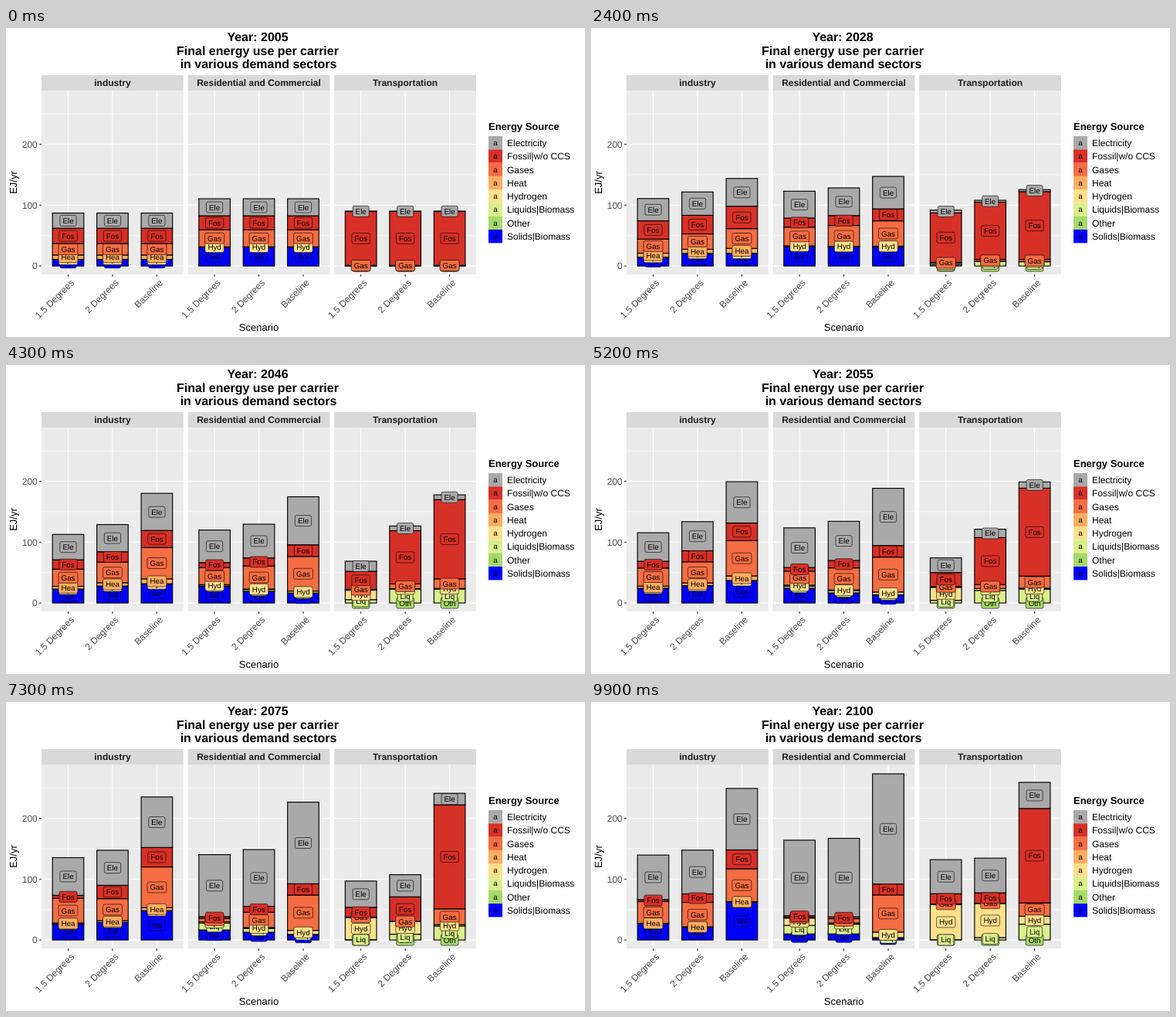
An HTML page that plays this animation: 750x400 px, repeating every 10000 ms.

```html
<!DOCTYPE html>
<html lang="en">
<head>
<meta charset="utf-8">
<title>Final energy use per carrier</title>
<style>
  html, body { margin: 0; width: 100%; height: 100%; overflow: hidden; background: #fff; }
  svg {
    display: block;
    font-family: "Liberation Sans", Arial, sans-serif;
    text-rendering: geometricPrecision;
  }
  .bold { font-weight: bold; }
</style>
</head>
<body>
<svg id="stage" width="750" height="400" viewBox="0 0 750 400"></svg>
<script>
const STEP_MS = 100, STEPS = 100, LAST = STEPS - 1;
const SPLIT = 16;                   // step of 2020, where the scenarios take over
const ZERO = 308.1, UNIT = 0.788;   // y of 0 EJ/yr, pixels per EJ/yr
const BAR_W = 40.6, LABEL_H = 14;

const CARRIERS = {
  Ele: ['Electricity', '#a9a9a9'],
  Fos: ['Fossil|w/o CCS', '#d73027'],
  Gas: ['Gases', '#f46d43'],
  Hea: ['Heat', '#fdae61'],
  Hyd: ['Hydrogen', '#fee08b'],
  Liq: ['Liquids|Biomass', '#d9ef8b'],
  Oth: ['Other', '#a6d96a'],
  Sol: ['Solids|Biomass', '#0000ff']
};
const SCENARIOS = ['1.5 Degrees', '2 Degrees', 'Baseline'];
const NONE = [0, [0, 0], [0, 0], [0, 0]];

// Energy use in EJ/yr, stacked from the top down: the value in 2005, then for
// each scenario a few values evenly spaced from 2020 to 2100.
const SECTORS = [
  { name: 'industry', x: 46, use: {
    Ele: [25, [34, 42, 61, 73], [35, 50, 72], [39, 72, 101]],
    Fos: [25, [33, 15, 5, 3], [34, 17, 22, 14], [39, 28, 32, 31]],
    Gas: [19, [21, 27, 31, 42, 36], [22, 34, 36, 40], [26, 52, 67, 54]],
    Hea: [7, [7, 3, 0.5], [7, 4, 0.7], [8, 8, 5, 1]],
    Hyd: NONE,
    Sol: [11, [12, 23, 26, 27], [17, 28, 29, 21], [17, 40, 62]]
  } },
  { name: 'Residential and Commercial', x: 235.6, use: {
    Ele: [28, [40, 54, 100, 124], [41, 56, 91, 129], [44, 80, 131, 181]],
    Fos: [23, [18, 8, 3, 2.5], [18, 13, 10, 3], [20, 18]],
    Gas: [28, [31, 28, 6, 1.5], [32, 38, 26, 7], [35, 57, 58, 61]],
    Hyd: [0.5, [0.5, 2, 2, 12], [0.5, 2], [0.5, 5, 9]],
    Liq: [0, [0, 1, 11, 14], [0, 3, 6, 16], [0, 1]],
    Sol: [31, [33, 27, 17, 10], [34, 19, 13, 10], [35, 16, 9, 3]]
  } },
  { name: 'Transportation', x: 425.2, use: {
    Ele: [0.6, [2, 17, 42, 56], [2, 8, 35, 57], [2, 8, 18, 43]],
    Fos: [88.6, [93, 29, 16, 17], [95, 87, 42, 17], [104, 131, 171, 155]],
    Gas: [0.4, [1.6, 0.6], [1.3, 8, 0.7, 0.5], [1, 16, 26, 22]],
    Hyd: [0.3, [0.3, 16, 35, 58], [0, 0.5, 19, 56], [0, 1, 2, 13]],
    Liq: [0.3, [0.8, 5.5, 0.5, 0.4], [2.5, 23, 10, 4], [2, 23, 23, 26]],
    Oth: NONE
  } }
];

const stage = document.getElementById('stage');

function add(parent, tag, attrs, text) {
  const el = document.createElementNS('http://www.w3.org/2000/svg', tag);
  for (const key in attrs) el.setAttribute(key, attrs[key]);
  if (text !== undefined) el.textContent = text;
  parent.appendChild(el);
  return el;
}
const rect = (x, y, width, height, fill) => add(stage, 'rect', { x, y, width, height, fill });
const line = (x1, y1, x2, y2, stroke, w) =>
  add(stage, 'line', { x1, y1, x2, y2, stroke, 'stroke-width': w });
const write = (text, x, y, size, more) =>
  add(stage, 'text', { x, y, 'font-size': size, ...more }, text);
const middle = { 'text-anchor': 'middle' };
const boldMiddle = { ...middle, class: 'bold' };

// Monotone cubic through the start value and the scenario's values.
function track(start, future) {
  const values = [start, ...future], n = values.length;
  const keys = [0, ...future.map((_, i) => SPLIT + (LAST - SPLIT) * i / (future.length - 1))];
  const gaps = future.map((_, i) => keys[i + 1] - keys[i]);
  const rates = gaps.map((g, i) => (values[i + 1] - values[i]) / g);
  const slopes = keys.map((_, i) => {
    if (i === 0) return rates[0];
    if (i === n - 1) return rates[n - 2];
    const a = rates[i - 1], b = rates[i];
    return a * b > 0 ? 2 * a * b / (a + b) : 0;
  });
  return step => {
    let i = 0;
    while (i < n - 2 && step > keys[i + 1]) i++;
    const g = gaps[i], u = (step - keys[i]) / g, v = 1 - u;
    return v * v * (1 + 2 * u) * values[i] + u * u * (3 - 2 * u) * values[i + 1]
      + g * u * v * (v * slopes[i] - u * slopes[i + 1]);
  };
}

function makeLabel(id) {
  const g = add(stage, 'g', {});
  const frame = add(g, 'rect', {
    y: -LABEL_H / 2, height: LABEL_H, rx: 2.2, fill: CARRIERS[id][1],
    stroke: '#000', 'stroke-width': 0.6
  });
  const text = add(g, 'text', { x: 0, y: 3.5, 'font-size': 9.8, ...middle }, id);
  const w = text.getComputedTextLength() + 7;
  frame.setAttribute('x', -w / 2);
  frame.setAttribute('width', w);
  return g;
}

function makeBar(use, scenario, cx) {
  // Bottom up, so upper labels cover lower ones.
  const parts = Object.keys(use).reverse().map(id => ({
    id,
    amount: track(use[id][0], use[id][scenario + 1]),
    box: add(stage, 'rect', {
      x: cx - BAR_W / 2, width: BAR_W, fill: CARRIERS[id][1], stroke: '#000', 'stroke-width': 1.15
    })
  }));
  for (const part of parts) part.label = makeLabel(part.id);
  return step => {
    let y = ZERO;
    for (const { amount, box, label } of parts) {
      const h = Math.max(0, amount(step)) * UNIT;
      y -= h;
      box.setAttribute('y', y);
      box.setAttribute('height', h);
      label.setAttribute('transform', `translate(${cx} ${y + h / 2})`);
    }
  };
}

function makePanel({ name, x, use }) {
  const w = 183.8;
  rect(x, 61, w, 20, '#d9d9d9');
  write(name, x + w / 2, 75, 12, { ...boldMiddle, fill: '#1a1a1a' });
  rect(x, 81, w, 238, '#ebebeb');
  for (let v = 0; v <= 250; v += 50) {
    const y = ZERO - v * UNIT;
    line(x, y, x + w, y, '#fff', v % 100 ? 0.53 : 1.07);
  }
  const centres = SCENARIOS.map((_, i) => x + 34.5 + i * 57.45);
  centres.forEach((cx, i) => {
    line(cx, 81, cx, 319, '#fff', 1.07);
    line(cx, 319, cx, 322, '#333', 1.07);
    write(SCENARIOS[i], 0, 0, 12, {
      'text-anchor': 'end', fill: '#4d4d4d', transform: `translate(${cx + 8.5} 330.5) rotate(-45)`
    });
  });
  return centres.map((cx, i) => makeBar(use, i, cx));
}

rect(0, 0, 750, 400, '#fff');
const heading = write('', 326, 17, 16, boldMiddle);
write('Final energy use per carrier', 326, 35, 16, boldMiddle);
write('in various demand sectors', 327, 52, 16, boldMiddle);

const bars = SECTORS.flatMap(makePanel);

for (const v of [0, 100, 200]) {
  const y = ZERO - v * UNIT;
  line(43, y, 46, y, '#333', 1.07);
  write(v, 40.8, y + 4.3, 12, { 'text-anchor': 'end', fill: '#4d4d4d' });
}
write('Scenario', 327.5, 392, 13, middle);
write('EJ/yr', 0, 0, 13, { ...middle, transform: 'translate(14 200) rotate(-90)' });

write('Energy Source', 625, 132, 13, { class: 'bold' });
Object.values(CARRIERS).forEach(([name, color], i) => {
  const y = 140 + i * 17.28;
  rect(625, y, 18, 17.4, color);
  write('a', 633.9, y + 12, 9.8, middle);
  write(name, 649, y + 13, 12);
});

function draw() {
  const step = Math.floor(performance.now() / STEP_MS) % STEPS;
  heading.textContent = 'Year: ' + (2005 + Math.round(step * 95 / LAST));
  bars.forEach(bar => bar(step));
  requestAnimationFrame(draw);
}
draw();
</script>
</body>
</html>
```
